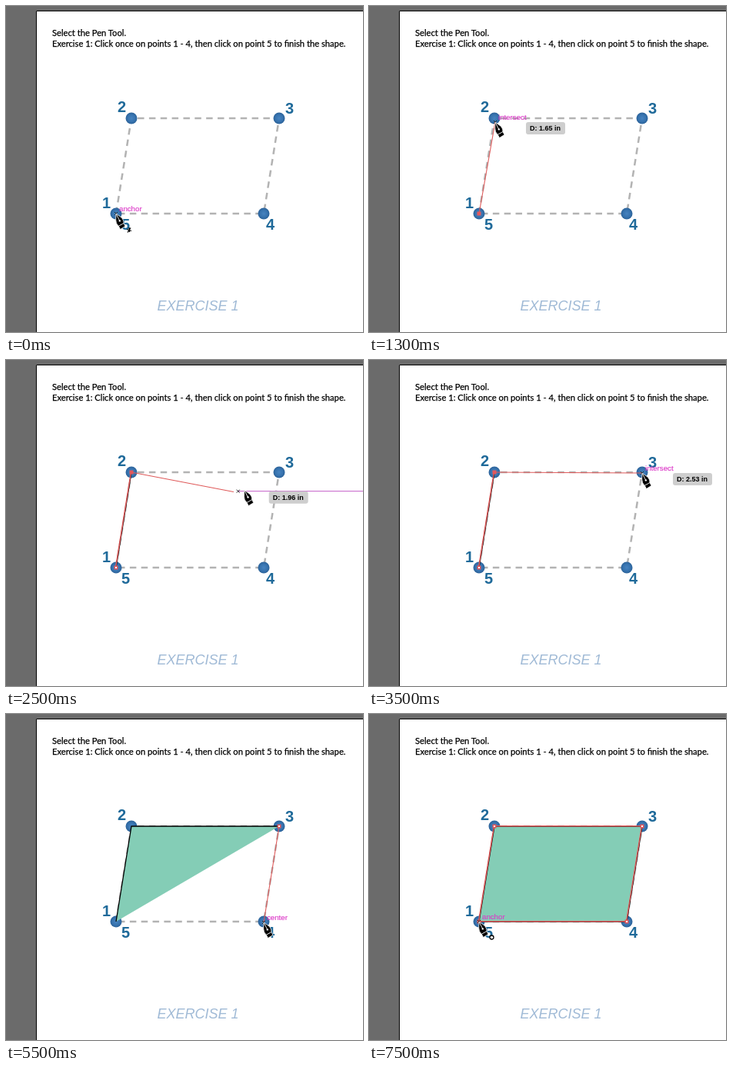
An HTML page that plays this animation: 464 by 424 pixels, repeating every 7900 ms.

```html
<!DOCTYPE html>
<html lang="en">
<head>
<meta charset="utf-8">
<title>Pen tool exercise 1</title>
<style>
html, body { margin: 0; width: 100%; height: 100%; overflow: hidden; background: #fff }
svg { display: block }
text { font-family: "Liberation Sans", Arial, sans-serif }
.intro text { font: 11.2px Lato, sans-serif; stroke: #000; stroke-width: .25 }
.num { font-size: 20px; font-weight: bold; fill: #1f6a9a }
.title { font-size: 18px; font-style: italic; fill: #a0bad6 }
.hint { font-size: 9.7px; fill: #dc3cc8; stroke: #dc3cc8; stroke-width: .15 }
.dist { font-size: 9px; font-weight: bold }
.guide { stroke: #c45fc8 }
.red { stroke: #df5a5a; fill: none }
</style>
</head>
<body>
<svg width="464" height="424" viewBox="0 0 464 424">
  <defs>
    <radialGradient id="ball">
      <stop offset="0" stop-color="#4783bf"/>
      <stop offset=".6" stop-color="#3874b0"/>
      <stop offset="1" stop-color="#2b6299"/>
    </radialGradient>
  </defs>
  <path d="M0 0H464V6H39V424H0Z" fill="#6b6b6b"/>
  <path d="M464 6.5H39.5V424" fill="none" stroke="#000"/>
  <g class="intro">
    <text x="60" y="39">Select the Pen Tool.</text>
    <text x="60" y="53">Exercise 1: Click once on points 1 - 4, then click on point 5 to finish the shape.</text>
  </g>
  <text class="title" x="196.5" y="396">EXERCISE 1</text>
  <g id="base"></g>
  <g id="live"></g>
</svg>
<script>
const LOOP = 7900, STEP = 100, PX_PER_INCH = 75.9;
const corners = [[143, 270], [163, 146], [355, 146], [335, 270]];
const clicks = [300, 1500, 3800, 5600, 7000];

// Each leg bends from the last stop through "via" and slows into "to".
const legs = [
  { at: 300, span: 900, via: [153, 210], to: [164, 151], hint: "intersect" },
  { at: 1800, span: 1500, via: [300, 196], to: [355, 147], hint: "intersect" },
  { at: 4100, span: 800, via: [404, 247], to: [335, 271], hint: "center" },
  { at: 5700, span: 850, via: [239, 327], to: [143, 270], hint: "anchor" }
];

const within = (t, a, b) => t >= a && t < b;
const gap = (a, b) => Math.hypot(a[0] - b[0], a[1] - b[1]);
const line = (a, b, attrs) =>
  `<line x1="${a[0]}" y1="${a[1]}" x2="${b[0]}" y2="${b[1]}" ${attrs}/>`;
const text = (x, y, cls, s) => `<text x="${x}" y="${y}" class="${cls}">${s}</text>`;
const cross = ([x, y], color) =>
  `<path d="M${x - 2} ${y - 2}l4 4m0 -4l-4 4" stroke="${color}"/>`;

const legAt = t => legs.findLastIndex(leg => t >= leg.at);

function penAt(t) {
  const i = legAt(t);
  if (i < 0) return corners[0];
  const { at, span, via, to } = legs[i];
  const from = i ? legs[i - 1].to : corners[0];
  const u = Math.sin(Math.min(1, (t - at) / span) * Math.PI / 2), v = 1 - u;
  return from.map((a, k) => v * v * a + 2 * u * v * via[k] + u * u * to[k]);
}

function anchor([x, y], solid) {
  return `<rect x="${x - 2.5}" y="${y - 2.5}" width="5" height="5" fill="#e4585c"/>` +
    (solid ? "" : `<rect x="${x - 1}" y="${y - 1}" width="2" height="2" fill="#fff"/>`);
}

function pen([x, y], badge) {
  const extra = {
    "*": '<path d="M14 20.5l6 2m-5 2l4 -6m-2 -.5l.5 6" stroke="#000" stroke-width="1.3"/>',
    "o": '<circle cx="16.5" cy="20.5" r="2.5" fill="#fff" stroke="#000" stroke-width="1.3"/>'
  }[badge] || "";
  return `<g transform="translate(${x} ${y})">
    <path d="M0 0L7.5 5.5Q10.5 9 10 12.5L12 16.5L5.5 20.5L3.5 16.5Q-.5 13 -.3 8Z"
      stroke="#fff" stroke-width=".8"/>
    <path d="M.5 1L4.5 9M3.4 16.2L10 12.5" stroke="#fff" stroke-width=".9"/>
    <circle cx="4.8" cy="9.4" r="1.2" fill="#fff"/>${extra}</g>`;
}

function outline(pts, closed, pressed) {
  const tag = closed ? "polygon" : "polyline";
  const shape = attrs => `<${tag} points="${pts.join(" ")}" ${attrs}/>`;
  return shape('fill="none" stroke="#000" stroke-width="1.3"') +
    (pressed ? "" : shape('class="red" stroke-width="1.5" transform="translate(-.5 -.2)"'));
}

function scene(t) {
  const placed = clicks.filter(c => t >= c).length;
  const closed = placed > 4;
  const pressed = within(t, 5300, 5600) || within(t, 7000, 7500);
  const tip = penAt(t), mark = penAt(t - 60), end = penAt(t - 100);
  const [mx, my] = mark;
  const pts = corners.slice(0, placed);
  const i = legAt(t), leg = legs[i];
  let out = "", hint = leg ? "" : "anchor";

  if (placed > 2) out += `<polygon points="${pts.join(" ")}" fill="#84cdb6"/>`;
  if (placed > 1) out += outline(pts, closed, pressed);
  if (placed && !closed) out += line(pts[placed - 1], end, 'class="red" stroke-width="1.1"');
  pts.forEach((p, k) => {
    const last = k == (closed ? 0 : placed - 1);
    if (!pressed || last) out += anchor(p, last && !pressed);
  });

  if (leg) {
    const goal = corners[(i + 1) % 4];
    const near = gap(tip, goal) < 12;
    const progress = (t - leg.at) / leg.span;
    const guided = within(progress, .4, .75);
    const crossing = guided && mx > 360;
    if (near || crossing) hint = near ? leg.hint : "intersect";
    if (guided) out += line(mark, [464, my], 'class="guide"');
    if (crossing) out += line([mx, 125], mark, 'class="guide"') + cross([mx, 140], "#c45fc8");
    if (placed == i + 1 && !pressed && progress < 1.2) {
      const inches = gap(corners[i], near ? goal : tip) / PX_PER_INCH;
      out += `<rect x="${mx + 40}" y="${my}" width="51" height="16" rx="3" fill="#cecece"/>` +
        text(mx + 45, my + 11, "dist", `D: ${inches.toFixed(2)} in`);
    }
  }
  out += text(mx + 4, my - 3, "hint", hint) + cross(mark, "#222");
  return out + pen(tip, t < clicks[0] ? "*" : t >= 6600 ? "o" : "");
}

// Odd corners carry their number above, even ones below; corner 1 has both.
const labels = [[-18, -7], [-18, -8], [8, -6], [3, 21], [7, 21]];
base.innerHTML =
  `<polygon points="${corners.join(" ")}" fill="none" stroke="#b3b3b3"
    stroke-width="2.5" stroke-dasharray="8.5 6.35"/>` +
  corners.map(([x, y]) => `<circle cx="${x}" cy="${y}" r="7.5" fill="url(#ball)"/>`).join("") +
  labels.map(([dx, dy], i) => {
    const [x, y] = corners[i % 4];
    return text(x + dx, y + dy, "num", i + 1);
  }).join("");

const start = performance.now();
let shown = -1;
function frame() {
  const t = Math.floor((performance.now() - start) % LOOP / STEP) * STEP;
  if (t != shown) live.innerHTML = scene(shown = t);
  requestAnimationFrame(frame);
}
frame();
</script>
</body>
</html>
```
